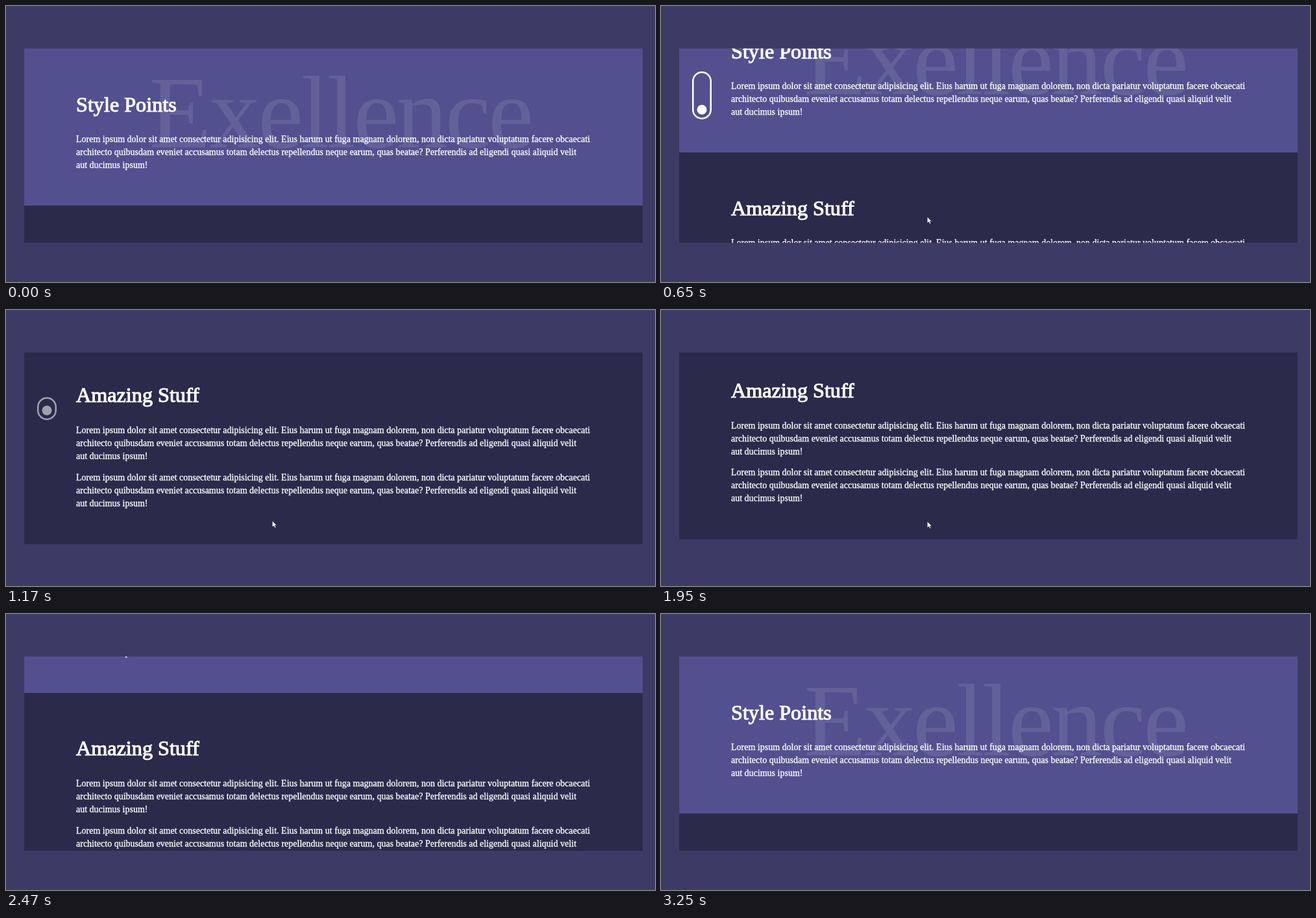
Animation of 1000x426 px, one loop 3510 ms. Source, as an HTML page:

```html
<!DOCTYPE html>
<html lang="en">
<head>
<meta charset="utf-8">
<title>Scrolling panel</title>
<style>
  html, body { margin: 0; width: 100%; height: 100%; overflow: hidden; background: #3c3b65; }
  svg { display: block; width: 100%; height: 100%; }
  text { font-family: "Liberation Serif", "Times New Roman", serif; fill: #fff; }
  .title { font-size: 32.2px; stroke: #fff; stroke-width: 1.1px; }
  .body { font-size: 14px; stroke: #fff; stroke-width: .3px; }
  .ghost { font-size: 158px; letter-spacing: -3.7px; fill-opacity: .1; }
</style>
</head>
<body>
<svg viewBox="0 0 1000 426">
  <clipPath id="view"><rect x="28" y="65.6" width="953" height="300"/></clipPath>
  <g clip-path="url(#view)">
    <g id="content">
      <rect x="28" y="65" width="953" height="243" fill="#52508e"/>
      <rect x="28" y="308" width="953" height="315.5" fill="#2c2a4b"/>
      <text class="ghost" x="220" y="218">Exellence</text>
    </g>
  </g>
  <g id="pill">
    <rect id="ring" x="49.25" width="27.5" rx="13.75" fill="none" stroke="#fff" stroke-width="2.5"/>
    <circle id="dot" cx="63" r="7.5" fill="#fff"/>
  </g>
  <path id="cursor" d="M0 0V9.6L2.3 7.5L3.9 10.8L5.5 10L4 6.9H6.9Z" fill="#fff" stroke="#1c1b33" stroke-width=".5"/>
</svg>
<script>
const LOOP = 3510, STEP = 130, SECTION = 242, DEPTH = 269.5;
const LINES = [
  'Lorem ipsum dolor sit amet consectetur adipisicing elit. Eius harum ut fuga magnam dolorem, non dicta pariatur voluptatum facere obcaecati',
  'architecto quibusdam eveniet accusamus totam delectus repellendus neque earum, quas beatae? Perferendis ad eligendi quasi aliquid velit',
  'aut ducimus ipsum!'
];

const $ = id => document.getElementById(id);
const content = $('content'), pill = $('pill'), ring = $('ring'), dot = $('dot'), cursor = $('cursor');

function addText(kind, y, string) {
  const node = document.createElementNS('http://www.w3.org/2000/svg', 'text');
  node.setAttribute('class', kind);
  node.setAttribute('x', 108);
  node.setAttribute('y', y);
  node.textContent = string;
  content.append(node);
}

function addSection(top, title, paragraphs) {
  addText('title', top + 96.5, title);
  for (let p = 0; p < paragraphs; p++) {
    LINES.forEach((line, i) => addText('body', top + 144.3 + p * 72.5 + i * 20, line));
  }
}

addSection(66, 'Style Points', 1);
addSection(66 + SECTION, 'Amazing Stuff', 2);

const ramp = (t, from, to) => Math.min(1, Math.max(0, (t - from) / (to - from)));
const ease = (t, from, to) => (1 - Math.cos(Math.PI * ramp(t, from, to))) / 2;

function draw(now) {
  const t = Math.floor(now % LOOP / STEP) * STEP;
  const scroll = DEPTH * (ease(t, 280, 1275) - ease(t, 2132, 3032));
  content.setAttribute('transform', `translate(0 ${-scroll})`);

  // The pill stretches downwards, then its top catches up as it fades.
  const top = 101 + 33.5 * ease(t, 780, 1170);
  const bottom = 131 + 44 * ease(t, 260, 650) - 5 * ease(t, 780, 1170);
  ring.setAttribute('y', top + 1.25);
  ring.setAttribute('height', bottom - top - 2.5);
  dot.setAttribute('cy', bottom - 15);
  pill.setAttribute('opacity', ramp(t, 260, 520) - ramp(t, 1040, 1330));

  cursor.setAttribute('transform', `translate(410.3 ${325.5 + ramp(t, 1170, 1430)})`);
  cursor.setAttribute('opacity', t >= 260 && t < 2210 ? 1 : 0);
}

let start;
function tick(now) {
  start ??= now;
  draw(now - start);
  requestAnimationFrame(tick);
}
draw(0);
requestAnimationFrame(tick);
</script>
</body>
</html>
```
